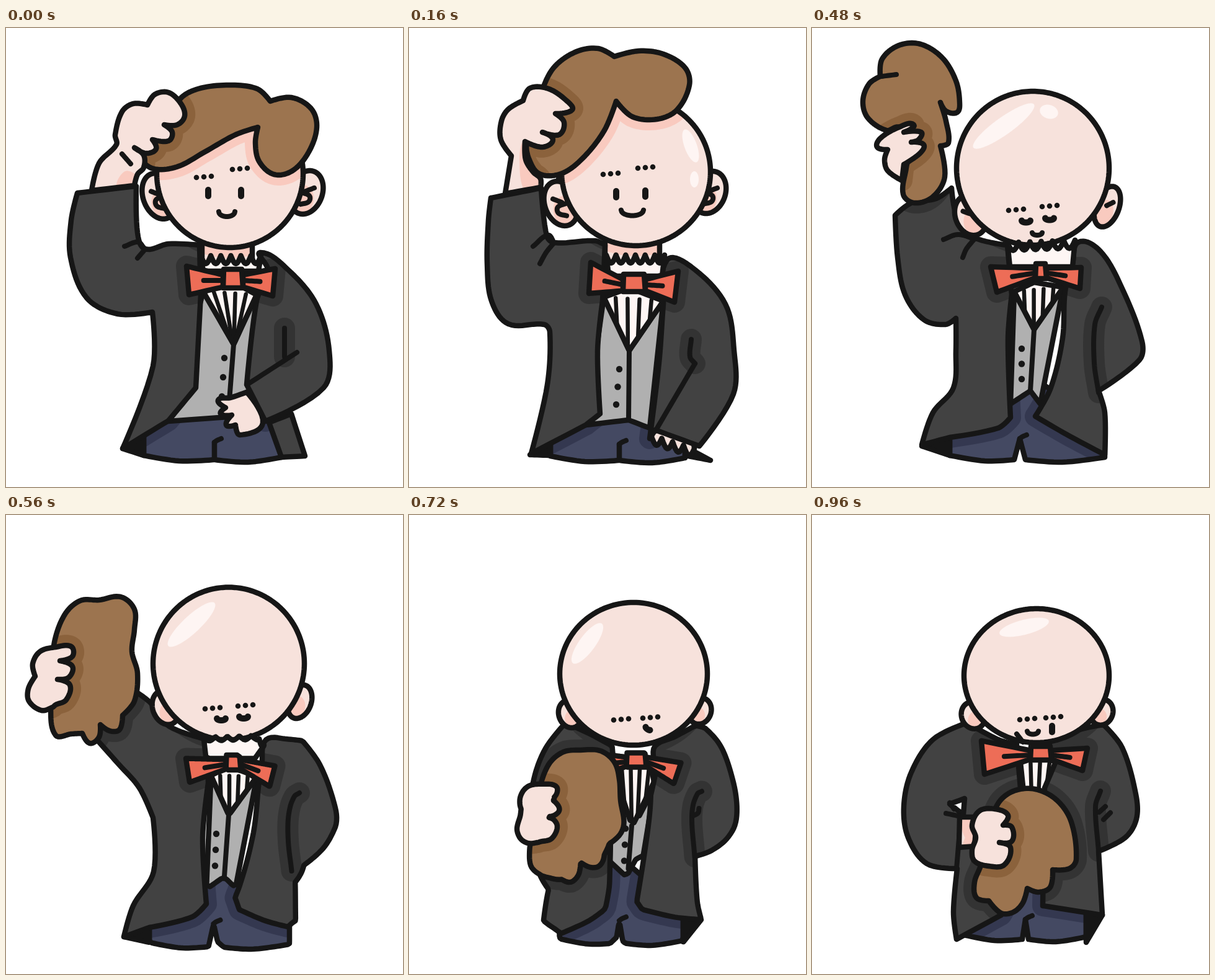
Animation of 640x740 px, one loop 1.28 s. Source, as an HTML page with a canvas:

```html
<!DOCTYPE html>
<html lang="en">
<head>
<meta charset="utf-8">
<title>Hat off</title>
<style>
html, body { margin: 0; width: 100%; height: 100%; overflow: hidden; background: #fff; }
canvas { display: block; }
</style>
</head>
<body>
<canvas id="stage" width="640" height="740"></canvas>
<script>
const INK = '#161616', STEP = 80, LOOP = 1280;

// The first letter of a part's key is its material.
const FILL = {
  S: '#f7e2dc', H: '#9c744f', J: '#424242', V: '#b0b0b0', W: '#fef6f4',
  B: '#ed6d57', P: '#444962', K: INK, A: '#fff', k: '#f9cabf', w: '#fef5f3'
};
const SHADE = { S: '#f9cabf', H: '#8b623c', J: '#333333', B: '#cc5b49', P: '#343850' };
const LINE = { l: 8, m: 6.5, e: 10 };

// Each part is darkened along the edge of the parts lying on it.
const CASTERS = {
  S0: 'S1', S1: 'H', S4: 'S5', H: 'S5', P: 'J J2',
  J: 'S1 B1 H', J2: 'S1 B2 H l20'
};

// Points run "x,y"; a trailing c makes a corner.
const tipped = {
  neck: '316,340 397,380',
  head: '361,235 118,119', ears: '247,271 26,38 484,265 26,36',
  brows: '319,240 377,227', eyes: '379,266 326,266', mouth: '356,300 13,4',
  vee: '318,425 367,510 404,430', hem: '262,634 358,627 400,622', buttons: '352,532 348,594', pinch: 0.9,
  pants: '222,444 336,668 0,696', tail: '188,678',
  flap: '424,636c 460,622c 482,690c 444,692c',
  collar: '314,367 411,367 0,392',
  bow: '366,404 16,15 291,384 295,430 434,388 430,432',
  coat: '115,266c 210,255c 212,330 224,356 262,348 312,350c 314,430c 306,580c 262,633c 188,678c 237,545 236,458c 180,461 130,435 104,370 105,310',
  side: '410,362 455,390 500,445 521,520 512,580 418,634c 388,575c 404,440 422,390',
  folds: ['191,352 213,345 222,354', '212,371 224,357'],
  seams: ['449,484 449,530', '390,574 469,523'],
  palm: '388,587c 414,637 377,656 370,640c 355,640 364,624c 346,622 354,612c 342,600 362,596',
  hair: '280,115 310,98 360,92 405,98 426,118c 460,112 492,130 501,160 488,200 462,230 432,236 408,215 402,185 406,160c 370,172 320,200 275,224 235,226 219,205',
  fist: '138,262c 150,218 178,188 176,172 187,135 205,122 228,124c 240,107 262,104 282,122 288,142 276,156 255,156c 268,168 262,182 236,180c 242,195 225,202 207,193c 222,205 222,225 212,236 207,254c',
  wrist: '208,256 210,238 190,232 180,262', crease: '187,203 201,219'
};

const lifting = {
  neck: '316,340 404,380',
  head: '366,232 120,119', ears: '245,283 26,37 484,265 26,35',
  brows: '325,235 381,225', eyes: '381,267 334,268', mouth: '360,298 18,4.5',
  shine: [[454, 190, 10, 28, -0.35], [460, 244, 7, 13, 0]],
  vee: '314,434 355,520 410,440', hem: '285,640 354,632 388,645', buttons: '339,550 334,607', pinch: 0.2,
  pants: '228,445 339,671 0,697', tail: '195,688', flare: '486,697',
  collar: '318,366 412,366 0,400',
  bow: '363,411 18,14 293,378 290,428 434,392 428,442',
  coat: '132,274c 213,258c 222,335 234,346 300,343 316,350c 312,440c 304,520 308,622c 285,640c 197,686c 223,575 227,490 218,478 160,477 133,440 126,380 128,310',
  side: '416,374 455,385 510,445 524,520 523,590 468,674c 397,648c 388,662c 403,540 410,445',
  folds: ['200,352 224,334 234,346', '211,380 221,362 234,346'],
  seams: ['455,502 453,530 461,541', '461,541 397,650'],
  knuckles: '390,656 460,678',
  hair: '216,97 235,62 270,38 305,33 331,46c 370,37 410,42 445,64 452,92 432,132 400,147 360,143 334,118c 315,165 280,210 245,235 210,235 193,210 190,185',
  fist: '155,267c 165,206c 148,180 149,150 160,131 184,117c 195,97 225,98 255,118 263,132 236,138c 250,152 242,172 215,168c 232,180 215,192 187,183c 188,212 200,232 212,243 212,257c',
  wrist: '187,184 178,210 190,268 220,260', crease: '241,243 245,248'
};

const lifted = {
  head: '364,223 121,125', ears: '249,279 22,36 477,279 23,36',
  brows: '326,259 382,252', eyes: '383,283 337,285', mouth: '362,310 14,3',
  shine: [[324, 155, 38, 10, -0.55]],
  vee: '320,420 350,512 412,435', hem: '255,640 347,624 370,638', buttons: '335,543 329,601', pinch: 0.15,
  pants: '224,466 335,669 7,698', tail: '185,670', flare: '489,682',
  collar: '318,347 426,344 0,390',
  bow: '366,386 13,15 284,363 282,416 440,385 424,422',
  coat: '130,284c 215,262c 222,295 230,338 250,348 290,338 320,345c 318,430c 312,520 316,612c 300,635 250,637c 183,669c 205,585 235,530 237,487c 200,488 155,465 130,410 127,340',
  side: '425,352 470,360 500,390 511,440 511,530 495,600 472,622c 488,682c 372,656c 395,560 412,440 420,400',
  folds: ['206,348 232,336', '220,364 245,345 258,350'],
  seams: ['468,474 457,488 455,540 468,612', '468,612 488,680'],
  hair: '168,105 180,70 210,52 262,51c 280,32 305,29 328,45 337,80 328,125 305,146 285,140 267,121c 268,160 255,210 238,236 212,248 195,230 183,208',
  fist: '166,268c 160,226c 130,210 126,180 142,157c 134,135 150,110 180,108 204,115 204,126 185,134c 201,146 198,160 181,162c 200,174 198,196 180,203c 190,215 206,243 215,258c',
  wrist: '180,205 176,222 190,268 220,258'
};

const raised = {
  head: '356,226 123,124', ears: '256,302 25,33 476,288 19,34',
  brows: '329,293 383,287', eyes: '383,308 345,312', shut: true, mouth: '363,332 8,2',
  shine: [[309, 158, 60, 14, -0.62], [382, 135, 15, 11, 0.3]],
  vee: '326,425 358,486 405,418', hem: '320,606 352,585 368,606', buttons: '338,517 338,566', pinch: 0.15,
  pants: '222,472 335,662 9,696', tail: '177,674',
  collar: '315,346 424,342 0,385',
  bow: '369,392 9,12 288,385 298,426 434,386 432,420',
  coat: '134,302c 160,282 200,275 225,258c 235,310 262,338 315,350c 322,430c 316,500 320,628c 300,645 222,660c 177,672c 195,620 228,580 232,520 232,468c 215,478 180,470 150,430 138,370',
  side: '430,345 465,360 500,420 532,505 528,535 462,585c 472,620 472,688c 410,655 360,626c 385,580 404,500 408,425 420,380',
  folds: ['212,341 235,333 262,340', '243,370 249,356 262,340'],
  seams: ['467,450 456,478 455,540 462,588'],
  hair: '110,78c 113,50 140,28 175,26 210,48 232,85 238,120 234,136 216,134 207,120c 216,150 220,185 207,190c 214,240 195,272 165,282 147,268 152,225 158,185 140,160 120,165 90,145 82,118 92,90',
  fist: '145,246c 122,230 117,212 122,196c 105,192 110,178 140,160 164,156 148,168c 176,168 172,180 160,184c 180,188 174,202 148,220c',
  crease: '112,78 136,75'
};

const bowing = {
  head: '362,253 121,122', ears: '259,319 17,23 471,314 18,22',
  brows: '337,330 389,327', eyes: '383,345 349,347', shut: true,
  shine: [[289, 195, 43, 14, -0.93]],
  vee: '335,415 360,482 404,425', hem: '326,600 352,580 372,595', buttons: '340,511 336,565', pinch: 0.15,
  pants: '240,442 334,656 7,696', tail: '203,686', flare: '474,660',
  collar: '322,370 412,368 1,400',
  bow: '364,406 15,12 292,400 294,436 433,423 418,455',
  coat: '255,335c 300,352 325,375c 330,435c 318,520 326,626c 300,650 240,670c 205,685c 215,640 245,570 243,505c 240,430',
  side: '408,380 440,365 470,338c 505,370 530,440 533,480 525,515 490,550 460,558c 463,630 475,660c 430,658 362,635c 385,560 402,490 406,430',
  seams: ['479,446 468,446 455,485 459,560', '455,490 464,486 462,476'],
  hair: '150,340 175,318 205,317 240,312 262,332 262,365 258,400 267,435 262,480 243,503c 238,526 222,528 207,518c 205,538 190,548 178,532c 160,533 135,535 127,490 131,430 133,385',
  fist: '130,490 112,495 92,480 91,460 102,440c 98,420 110,400 135,393 160,392 162,408 142,415c 162,424 156,442 138,445c 158,454 152,478 135,486'
};

const wiped = {
  head: '362,259 117,108', ears: '260,323 19,22 467,318 18,21',
  brows: '347,329 389,326', eyes: '387,345', mouth: '356,351 9,2.5',
  shine: [[286, 219, 36, 12, -0.95], [265, 266, 8, 10, 0]],
  vee: '322,400 358,520 398,400', hem: '320,560 355,560 375,560', buttons: '358,500 358,550', pinch: 0.6,
  pants: '245,442 344,652 5,684', flare: '468,645',
  bow: '369,384 17,11 273,364 278,418 444,376 436,412',
  coat: '250,335c 300,362 330,370c 336,440c 325,600 305,645c 233,684c 228,640 234,570c 185,562 155,520 148,470 160,415 195,362',
  side: '385,365 470,338c 500,375 522,450 523,490 505,520 462,542c 468,645c 372,630c 375,440c 392,400c',
  gap: '222,466c 246,457c 244,483c',
  folds: ['216,481 240,486c 233,570', '222,464 229,474'],
  seams: ['465,445 457,470 462,542', '463,479 473,470', '470,491 481,480'],
  hair: '300,465 325,445 360,442 395,460 418,495 426,555 415,570 388,572c 384,600 365,608 347,602c 340,625 325,640 305,642 285,622c 265,617 262,592 272,565 285,510',
  cuff: '238,487c 266,487c 262,534c 237,536c',
  fist: '285,566 262,558 258,540 264,520 258,500 270,477 295,474 316,484 308,500c 322,503 322,526 302,528c 320,536 310,564'
};

const glint = { ...wiped, shine: [[342, 181, 41, 12, -0.25]], crease: '330,353 340,366' };

const mix = (a, b, t) => a + (b - a) * t;
const mid = (a, b, t) => [mix(a[0], b[0], t), mix(a[1], b[1], t)];
const gap = (a, b) => Math.hypot(b[0] - a[0], b[1] - a[1]);
const poly = list => list.map(([x, y]) => [x, y, true]);
const range = (n, f) => Array.from({ length: n }, (_, i) => f(i));
const pts = s => s.split(' ').map(t => {
  const [x, y] = t.split(',');
  return [+x, parseFloat(y), y.endsWith('c')];
});

// Smooth curve through the points, with tangents scaled to each span.
function curve(p, closed) {
  const n = p.length, out = [];
  const at = i => closed ? p[(i + n) % n] : p[Math.max(0, Math.min(n - 1, i))];
  const pull = (i, len) => {
    if (at(i)[2]) return [0, 0];
    const a = at(i - 1), b = at(i + 1), k = len / 3 / (gap(a, b) || 1);
    return [(b[0] - a[0]) * k, (b[1] - a[1]) * k];
  };
  for (let i = 0; i < (closed ? n : n - 1); i++) {
    const a = at(i), b = at(i + 1), len = gap(a, b);
    const u = pull(i, len), v = pull(i + 1, len);
    for (let k = 0; k < 10; k++) {
      const t = k / 10, s = 1 - t;
      out.push([0, 1].map(c => s * s * s * a[c] + 3 * s * s * t * (a[c] + u[c]) +
        3 * s * t * t * (b[c] - v[c]) + t * t * t * b[c]));
    }
  }
  out.push((closed ? p[0] : p[n - 1]).slice(0, 2));
  return out;
}

function ellipse(x, y, rx, ry, turn = 0) {
  const c = Math.cos(turn), s = Math.sin(turn);
  return range(24, i => {
    const a = Math.PI * (1 - i / 12), u = rx * Math.cos(a), v = ry * Math.sin(a);
    return [x + u * c - v * s, y + u * s + v * c];
  });
}

const smile = ([x, y], w, d) => range(9, i => {
  const a = Math.PI * i / 8;
  return [x - w * Math.cos(a), y + d * (2 * Math.sin(a) - 1)];
});

// A row of round lobes hanging from a to b, closed off at the given height.
function frill(a, b, lobes, depth, end) {
  const steps = lobes * 8;
  const edge = range(steps + 1, i => {
    const [x, y] = mid(a, b, i / steps);
    return [x, y + depth * Math.abs(Math.sin(Math.PI * i / 8))];
  });
  return poly([...edge, [b[0] - 4, end], [a[0] + 4, end]]);
}

function build(p) {
  const parts = {};
  const add = (key, src) => {
    if (!src) return;
    const list = typeof src === 'string' ? pts(src) : src;
    parts[key] = key[0] === 'd' ? list : curve(list, !LINE[key[0]]);
  };
  const addAll = (key, list = []) => list.forEach((s, i) => add(key + i, s));

  if (p.neck) {
    const [a, b] = pts(p.neck);
    add('S0', poly([a, [b[0], a[1]], b, [a[0], b[1]]]));
  }

  const [[x0, x1], crotch, [slit, foot]] = pts(p.pants), [cx, cy] = crotch;
  add('P', [
    ...poly([[cx, 550], [x0, 640], [x0, foot - 7]]), [(x0 + cx) / 2, foot + 2],
    ...poly([[cx - slit, foot], crotch, [cx + slit, foot]]), [(x1 + cx) / 2, foot + 4],
    ...poly([[x1, foot - 4], [x1, 640]])
  ]);
  add('l10', [[cx, cy], [cx + 4, cy - 3], [cx + 11, cy - 6]]);
  for (const [key, tip, x] of [['K0', p.tail, x0], ['K1', p.flare, x1]]) {
    if (!tip) continue;
    const [t] = pts(tip);
    add(key, poly([t, [x, t[1] - 22], [x, 689]]));
  }
  add('J3', p.flap);

  const [a, tip, b] = pts(p.vee), hem = pts(p.hem), [top, low] = pts(p.buttons);
  add('V', poly([a, tip, b, hem[2], hem[1], hem[0]]));
  add('l11', [tip, hem[1]]);
  add('d1', range(3, i => mid(top, low, i / 2)));
  add('W', poly([a, tip, b, [tip[0], a[1] - 15]]));
  for (let i = 1; i < 5; i++) {
    const from = mid(a, b, i / 5);
    add('m' + i, [from, [mix(from[0], tip[0], p.pinch), tip[1]]]);
  }

  add('S6', p.palm);
  if (p.knuckles) add('S6', frill(...pts(p.knuckles), 4, 14, 640));
  add('J2', p.side);
  addAll('l2', p.seams);
  add('J', p.coat);
  add('A', p.gap);
  addAll('l3', p.folds);

  const [earL, sizeL, earR, sizeR] = pts(p.ears);
  for (const [id, [x, y], [rx, ry], side] of [[4, earL, sizeL, -1], [5, earR, sizeR, 1]]) {
    const spot = (u, v) => [x - side * u * rx, y + v * ry];
    add('S' + (id + 3), ellipse(x, y, rx, ry, side * 0.35));
    add('k' + id, ellipse(...spot(0.35, 0.35), rx * 0.8, ry * 0.7, side * 0.35));
    if (ry > 30) add('l' + id + 0, [spot(-0.5, -0.2), spot(0.05, -0.05)]);
    if (ry > 34) add('l' + id + 1, [spot(0.3, 0), spot(-0.2, 0.16), spot(-0.15, 0.42), spot(0.35, 0.53)]);
  }

  add('S1', ellipse(...pts(p.head).flatMap(q => q.slice(0, 2))));
  (p.shine || []).forEach((s, i) => add('w' + i, ellipse(...s)));
  add('d0', pts(p.brows).flatMap(([x, y]) => range(3, i => [x + (i - 1) * 12, y + 1 - i])));
  pts(p.eyes).forEach(([x, y], i) =>
    add('e' + i, p.shut ? smile([x, y], 7, 1.5) : [[x, y - 5], [x, y + 5]]));
  if (p.mouth) {
    const [at, [w, d]] = pts(p.mouth);
    add('l6', smile(at, w, d));
  }

  if (p.collar) {
    const [from, to, [flat, end]] = pts(p.collar);
    add('W2', frill(from, to, 6, flat ? 0 : 13, end));
  }
  const [[kx, ky], [kw, kh], ...ends] = pts(p.bow);
  [-1, 1].forEach((side, i) => {
    const [hi, lo] = ends.slice(i * 2), x = kx + side * kw;
    add('B' + (i + 1), poly([hi, [x, ky - kh * 0.4], [x, ky + kh * 0.9], lo]));
    add('l7' + i, [mid(mid(hi, lo, 0.5), [x, ky + 3], 0.45), [x, ky + 3]]);
  });
  add('B0', poly([[kx - kw + 1, ky - kh], [kx + kw - 2, ky - kh], [kx + kw, ky + kh], [kx - kw, ky + kh]]));

  add('H', p.hair);
  add('S4', p.cuff);
  add('S5', p.fist);
  add('k6', p.wrist);
  add('l8', p.crease);
  return parts;
}

function resample(p, n = 160) {
  const sum = [0];
  for (let i = 1; i < p.length; i++) sum.push(sum[i - 1] + gap(p[i - 1], p[i]));
  const total = sum[p.length - 1];
  let j = 1;
  return range(n + 1, i => {
    const d = total * i / n;
    while (j < p.length - 1 && sum[j] < d) j++;
    return mid(p[j - 1], p[j], Math.min(1, (d - sum[j - 1]) / (sum[j] - sum[j - 1] || 1)));
  });
}

// Halfway pose of the parts both neighbours share.
function between(a, b) {
  const out = {};
  for (const key in a) {
    if (!b[key]) continue;
    const [p, q] = [a[key], b[key]].map(s => key[0] === 'd' ? s : resample(s));
    out[key] = p.map((v, i) => mid(v, q[i], 0.5));
  }
  return out;
}

const poses = [tipped, lifting, lifted, raised, bowing, wiped, glint].map(build);
const frames = poses.flatMap((p, i) => i < 6 ? [p, between(p, poses[i + 1])] : [p]);

// The arm swings wide on its way down.
const swing = frames[7];
for (const key of ['H', 'S5']) swing[key] = poses[4][key].map(([x, y]) => [x - 55, y - 180]);
swing.J = curve(pts('140,278c 185,275 230,300 262,340 325,362c 326,432c 317,520 323,627c 300,648 231,665c 190,680c 205,630 238,575 237,488c 215,440 180,400 140,355c'), true);

const ctx = document.getElementById('stage').getContext('2d');
ctx.lineJoin = ctx.lineCap = 'round';

function trace(p, closed) {
  const path = new Path2D();
  p.forEach(([x, y]) => path.lineTo(x, y));
  if (closed) path.closePath();
  return path;
}

function ink(path, width, color = INK) {
  ctx.strokeStyle = color;
  ctx.lineWidth = width;
  ctx.stroke(path);
}

function within(shape, paint) {
  ctx.save();
  if (shape) ctx.clip(shape);
  paint();
  ctx.restore();
}

function draw(frame) {
  let shape = null;
  const finish = () => { if (shape) ink(shape, 8.5); shape = null; };
  ctx.fillStyle = '#fff';
  ctx.fillRect(0, 0, 640, 740);
  for (const key in frame) {
    const type = key[0], p = frame[key], path = trace(p, !LINE[type]);
    const inside = 'mkw'.includes(type);
    if (!inside) finish();
    ctx.fillStyle = FILL[type] || INK;
    if (type === 'd') {
      for (const [x, y] of p) {
        ctx.beginPath();
        ctx.arc(x, y, key === 'd0' ? 4.3 : 5.2, 0, 7);
        ctx.fill();
      }
    } else if (inside) {
      within(shape, () => LINE[type] ? ink(path, LINE[type]) : ctx.fill(path));
    } else if (LINE[type]) {
      ink(path, LINE[type]);
    } else {
      ctx.fill(path);
      within(path, () => {
        for (const by of (CASTERS[key] || '').split(' ')) {
          if (frame[by]) ink(trace(frame[by], !LINE[by[0]]), 34, SHADE[type]);
        }
      });
      shape = path;
    }
  }
  finish();
}

let shown = -1;
function tick() {
  const i = Math.min(frames.length - 1, Math.floor(performance.now() % LOOP / STEP));
  if (i !== shown) draw(frames[shown = i]);
  requestAnimationFrame(tick);
}
tick();
</script>
</body>
</html>
```
